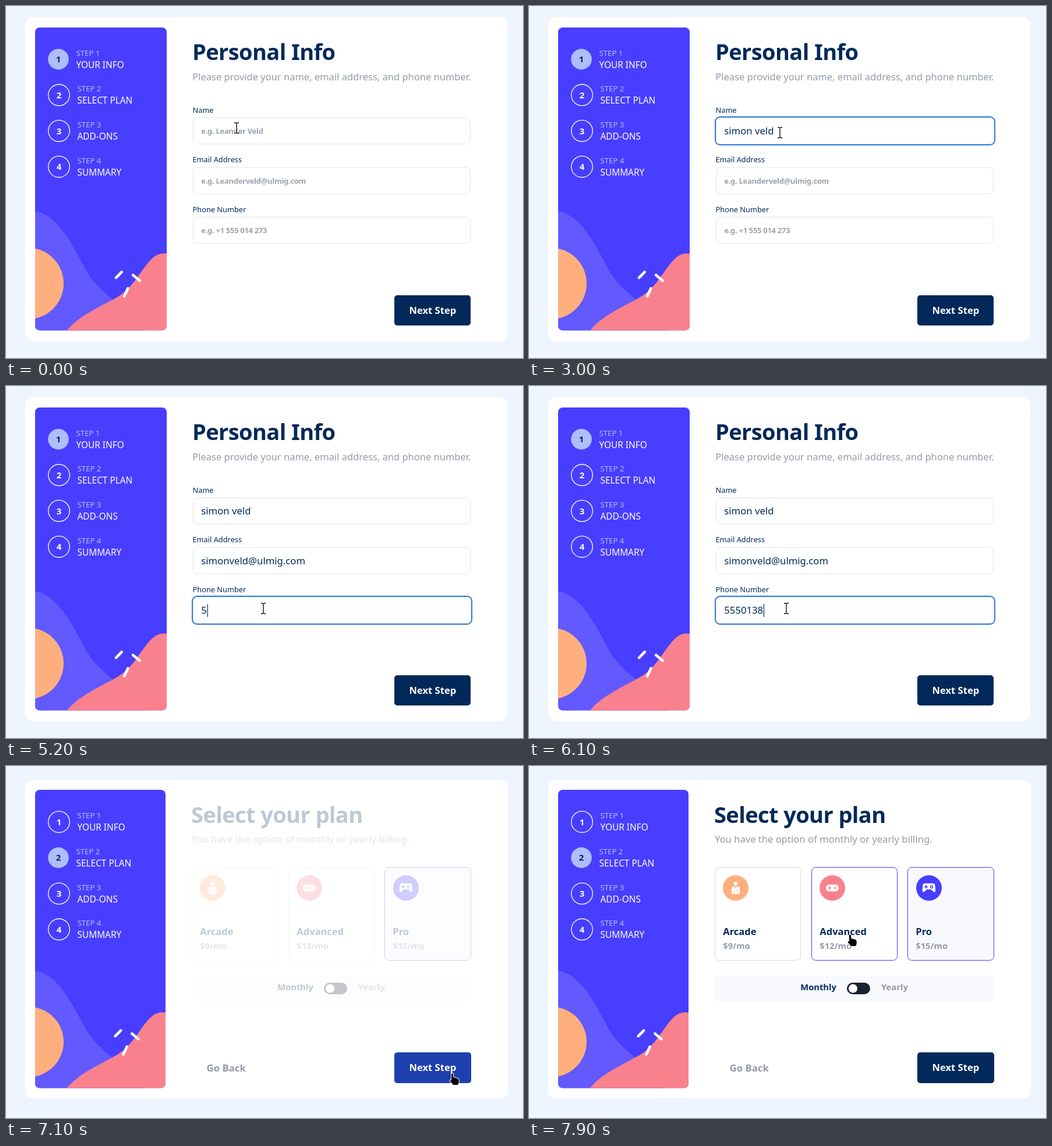
These frames come from a looping animation (888x606 px, 8000 ms). An HTML page:

```html
<!DOCTYPE html>
<html lang="en">
<head>
<meta charset="utf-8">
<title>Sign-up form</title>
<style>
html, body { margin: 0; width: 100%; height: 100%; overflow: hidden; background: #eef5ff; }
svg { display: block; }
text { font-family: "Noto Sans", "Open Sans", sans-serif; white-space: pre; }
</style>
</head>
<body>
<svg id="stage" width="888" height="606"></svg>
<script>
const LOOP = 8000, STEP = 100;
const NAVY = '#022959', GRAY = '#9699ab', BLUE = '#483eff', PALE = '#adbeff';
const stage = document.getElementById('stage');
const pen = document.createElement('canvas').getContext('2d');

const text = (x, y, s, size, weight, fill, extra = '') =>
  `<text x="${x}" y="${y}" font-size="${size}" font-weight="${weight}" fill="${fill}" ${extra}>${s}</text>`;
const rect = (x, y, w, h, r, fill, stroke = 'none', sw = 1) =>
  `<rect x="${x}" y="${y}" width="${w}" height="${h}" rx="${r}" fill="${fill}" stroke="${stroke}" stroke-width="${sw}"/>`;
const disc = (x, y, r, fill, extra = '') => `<circle cx="${x}" cy="${y}" r="${r}" fill="${fill}" ${extra}/>`;
const path = (d, fill, extra = '') => `<path d="${d}" fill="${fill}" ${extra}/>`;
const title = (x, y, s) => text(x, y, s, 38, 600, NAVY, 'letter-spacing="-.6"');

// Form content and the moments at which each character appears
const fields = [
  { label: 'Name', hint: 'e.g. Leander Veld', value: 'simon veld',
    keys: [1100, 1200, 1300, 1400, 1500, 1600, 2100, 2300, 2400, 2400] },
  { label: 'Email Address', hint: 'e.g. Leanderveld@ulmig.com', value: 'simonveld@ulmig.com',
    keys: Array(19).fill(3700) },
  { label: 'Phone Number', hint: 'e.g. +1 555 014 273', value: '5550138',
    keys: [5200, 5400, 5500, 5700, 5800, 5900, 6100] }
];
const fieldTop = i => 192.5 + i * 85.5;
const cards = [
  { x: 319.5, name: 'Arcade', price: '$9/mo', color: '#ffaf7e' },
  { x: 485.5, name: 'Advanced', price: '$12/mo', color: '#f9818e' },
  { x: 650.5, name: 'Pro', price: '$15/mo', color: BLUE }
];

// Pointer stops: time, x, y
const track = [
  [0, 396, 210], [400, 396, 210], [500, 402, 211], [600, 407, 214], [700, 407, 214], [800, 407, 213],
  [1400, 407, 213], [1700, 431, 217], [2900, 431, 217], [3000, 431, 218], [3200, 410, 304],
  [4100, 410, 304], [4200, 415, 361], [4300, 422, 388], [4400, 422, 388], [4700, 441, 376],
  [5100, 441, 376], [5200, 442, 383], [6100, 442, 383], [6700, 767, 530], [7100, 767, 530],
  [7800, 552, 291], [LOOP, 552, 291]
];
function pointerAt(t) {
  const i = track.findIndex(k => k[0] > t);
  const [t0, x0, y0] = track[i - 1], [t1, x1, y1] = track[i];
  const p = (t - t0) / (t1 - t0);
  return { x: x0 + (x1 - x0) * p, y: y0 + (y1 - y0) * p };
}
const over = (p, x, y, w, h) => p.x >= x && p.x <= x + w && p.y >= y && p.y <= y + h;

function pointer({ x, y }, kind) {
  const beam = 'M-4-9h2.5L0-8l1.5-1H4M0-8V8M-4 9h2.5L0 8l1.5 1H4';
  const solid = 'stroke="#fff" stroke-width="2" stroke-linejoin="round" paint-order="stroke"';
  const shape = {
    beam: path(beam, 'none', 'stroke="#fff" stroke-width="3"') + path(beam, 'none', 'stroke="#111" stroke-width="1.4"'),
    arrow: path('M0 0V16l3.8-3.5 2.5 6 3-1.2-2.6-5.8h5z', '#000', solid),
    hand: path('M-2 1q0-1.7 1.6-1.7T1.2 1v5q3 0 4 1 4 0 4.5 2 1 .5 1 2v3q0 3-2 5H1q-2-3-5.5-6.5 0-2 2-2l.5 1z', '#000', solid)
  }[kind];
  return `<g transform="translate(${x} ${y})">${shape}</g>`;
}

function sidebar(y, w, h, first, active) {
  const s = h / 568;
  let out = `<clipPath id="panel">${rect(50, y, w, h, 8, '#000')}</clipPath><g clip-path="url(#panel)">` +
    rect(50, y, w, h, 0, BLUE) +
    `<g transform="translate(${50 + (w - 274 * s) / 2} ${y}) scale(${s})">` +
    path('M-34.7 543.1C3.2 632.5 168.8 685 212 612.5c43.2-72.5-66.1-85.7-104.7-160.6-38.6-74.9-68.7-121.7-124.5-104.6-55.8 17.1-55.4 106.3-17.5 195.8Z', '#6259ff') +
    path('M233.1 601.2c60.7-28.3 92.8-143.5 41.9-171.5-51-28-57.4 47.6-108.1 76-50.7 28.4-82.1 40.2-103.4 77.2-21.3 37.1 108.9 46.6 169.6 18.3Z', '#f9818e') +
    path('m165.3 469.1 10.6-10.8m33.6 16.3-12.5-10.5m-9.4 24.9-6.9 14.8', 'none', 'stroke="#fff" stroke-width="5" stroke-linecap="round"') +
    disc(.3, 479.9, 67, '#ffaf7e') + '</g></g>';
  ['YOUR INFO', 'SELECT PLAN', 'ADD-ONS', 'SUMMARY'].forEach((name, i) => {
    const on = i === active, cy = first + i * 61.7, cx = on ? 90 : 91, tx = on ? 120.5 : 122.5;
    out += disc(cx, cy, on ? 17.8 : 18.3, on ? PALE : 'none', on ? '' : 'stroke="#fff" stroke-width="1.3"') +
      text(cx, Math.round(cy + 5.5), i + 1, 15, 600, on ? NAVY : '#fff', 'text-anchor="middle"') +
      text(tx, Math.round(cy - 6), `STEP ${i + 1}`, 13.2, 400, PALE) +
      text(tx, Math.round(cy + 15), name, 15.4, 500, '#fff');
  });
  return out;
}

const nextButton = (y, w, h, hover) =>
  rect(667, y, w, h, 5, hover ? '#1e40af' : NAVY) + text(692.5, y + 32, 'Next Step', 16.6, 600, '#fff');

function infoPage(t, p) {
  const focus = t < 300 ? -1 : t < 3400 ? 0 : t < 4500 ? 1 : 2;
  const caretOn = t < 2700 || t >= 3400;
  const hover = over(p, 667, 498, 131, 52);
  let out = rect(33, 19, 828, 558, 14, '#fff') + sidebar(37, 226, 521.6, 91.6, 0) +
    title(320, 93, 'Personal Info') +
    text(320.3, 128, 'Please provide your name, email address, and phone number.', 16.5, 400, GRAY) +
    nextButton(498, 131, 52, hover);
  fields.forEach((f, i) => {
    const top = fieldTop(i), typed = f.value.slice(0, f.keys.filter(k => k <= t).length);
    out += text(320.5, Math.floor(top - 8.5), f.label, 12.8, 400, NAVY) +
      rect(321.5, top, 476, 45.2, 7, '#fff', '#e2e4e9');
    if (i === focus) out += rect(320, top - 1.5, 480, 48, 8, 'none', '#2f7bdc', 2);
    out += typed ? text(335.3, Math.round(top + 28.5), typed, 16.7, 400, NAVY)
      : text(335.3, Math.round(top + 27.5), f.hint, 13, 600, '#9ca3af', 'letter-spacing="-.3"');
    if (i === focus && caretOn) {
      pen.font = '16.7px "Noto Sans", "Open Sans", sans-serif';
      out += rect(336 + pen.measureText(typed).width, top + 12, 1.2, 22, 0, NAVY);
    }
  });
  const inField = fields.some((f, i) => over(p, 321, fieldTop(i), 477, 45));
  return out + pointer(p, inField ? 'beam' : hover ? 'hand' : 'arrow');
}

const icons = [
  disc(355, 202, 3.3, '#fff') + rect(354, 204, 2, 6, 0, '#fff') + rect(348, 208, 14, 12.5, 1.5, '#fff') +
    path('M355 207v4M352 217h2M357 213v2', 'none', 'stroke="#ffaf7e" stroke-width="1.5"'),
  rect(510, 204, 22, 12, 6, '#fff') +
    path('M513 210h6m-3-3v6', 'none', 'stroke="#f9818e" stroke-width="1.6"') +
    [[524, 210], [528, 210], [526, 208], [526, 212]].map(c => disc(...c, 1, '#f9818e')).join(''),
  path('M680 202h14q3 0 3.5 4l.7 8q0 3-2.3 3-1.5 0-3-2l-2-2.5h-8l-2 2.5q-1.5 2-3 2-2.3 0-2.3-3l.7-8q.5-4 3.7-4Z', '#fff') +
    path('M679 208h6m-3-3v6', 'none', `stroke="${BLUE}" stroke-width="1.6"`) +
    disc(691.5, 208, 2, 'none', `stroke="${BLUE}" stroke-width="1.4"`)
];

function planPage(t, p) {
  const hover = over(p, 667, 493, 132, 53);
  const onCard = cards.some(c => over(p, c.x, 174, 148, 161));
  let out = rect(33, 24, 829, 548, 14, '#fff') + sidebar(41, 224, 513.6, 96.2, 1) +
    text(344.5, 526, 'Go Back', 16.8, 600, GRAY) + nextButton(493, 132, 53, hover) +
    `<g opacity="${Math.min(1, (t - 6900) / 800)}">` +
    title(318, 98, 'Select your plan') +
    text(319, 132, 'You have the option of monthly or yearly billing.', 16.6, 400, GRAY);
  cards.forEach((c, i) => {
    const lit = i === 2 || (i === 1 && t >= 7900);
    out += rect(c.x, 174.5, i === 2 ? 148 : 147, 160, 7, i === 2 ? '#f8f9ff' : '#fff', lit ? BLUE : '#d6d9e6') +
      disc(c.x + (i === 2 ? 36.5 : 35.5), 210, 22, c.color) + icons[i] +
      text(c.x + 13.8, 291, c.name, 16.5, 600, NAVY) +
      text(c.x + 13.8, 315, c.price, 14.7, 600, GRAY);
  });
  out += rect(319, 361, 480, 44, 7, '#f8f9fc') +
    text(466.3, 386, 'Monthly', 14.7, 600, NAVY) + text(605, 386, 'Yearly', 14.9, 600, GRAY) +
    rect(546, 373, 40, 20, 10, '#1a2030') + disc(556.5, 383, 7.6, '#fff') + '</g>';
  return out + pointer(p, hover || onCard ? 'hand' : 'arrow');
}

let shown = -1;
function draw() {
  const t = Math.floor(performance.now() % LOOP / STEP) * STEP;
  if (t !== shown) {
    shown = t;
    stage.innerHTML = (t < 7000 ? infoPage : planPage)(t, pointerAt(t));
  }
  requestAnimationFrame(draw);
}
draw();
</script>
</body>
</html>
```
